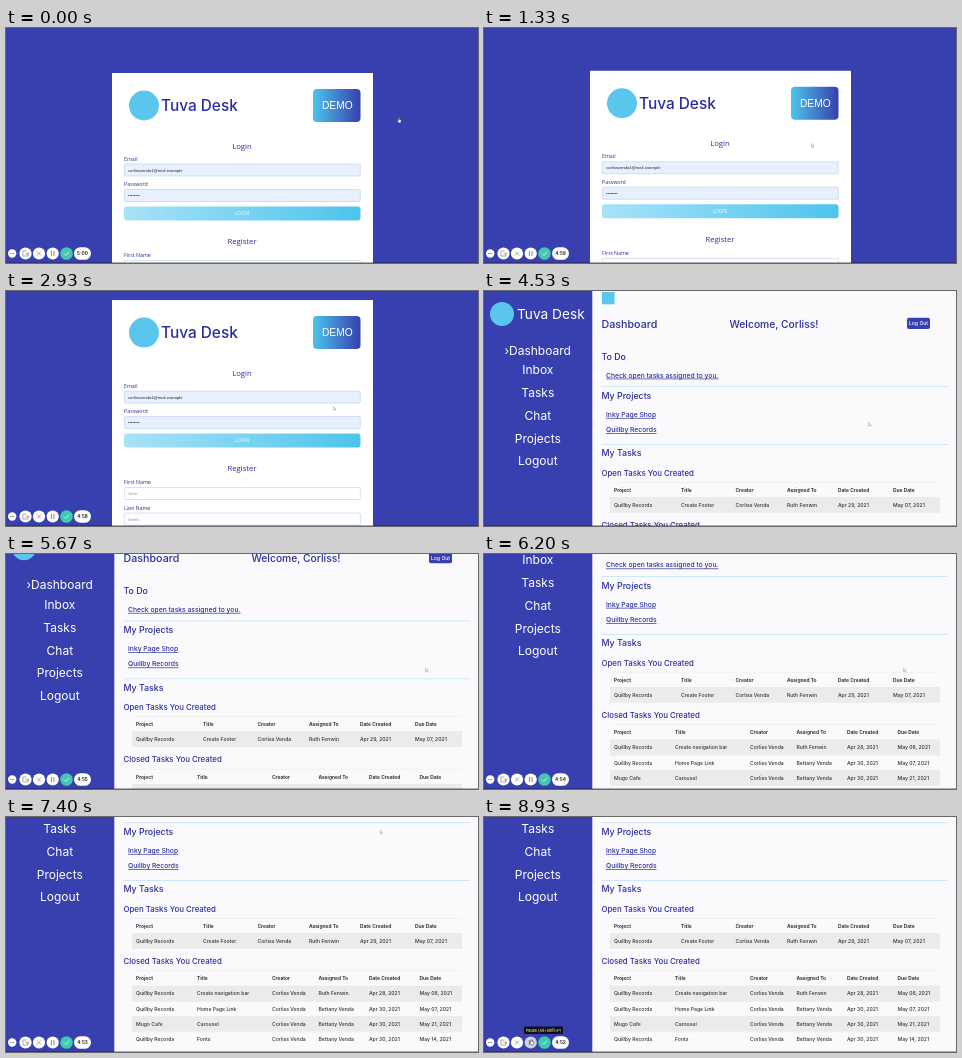
Write an HTML page that moves like this. It is 472 px wide and 235 px high and loops after 9.07 s.

```html
<!DOCTYPE html>
<html lang="en">
<head>
<meta charset="utf-8">
<title>Team workspace demo</title>
<style>
  html, body { margin: 0; width: 100%; height: 100%; overflow: hidden; background: #3740ae; }
  svg { display: block; width: 100vw; height: 100vh; }
  text { font-family: Inter, sans-serif; white-space: pre; }
  .form text { font-family: "Open Sans", sans-serif; font-weight: 500; }
  .form .arial { font-family: "Liberation Sans", Arial, sans-serif; }
  .form .brand { font-family: Inter, sans-serif; }
  .main text { font-weight: 500; }
  .main .head { font-weight: 700; }
  .link { text-decoration: underline; }
</style>
</head>
<body>
<svg id="stage" viewBox="0 0 472 235" preserveAspectRatio="none" xmlns="http://www.w3.org/2000/svg"></svg>
<script>
const LOOP = 9070, STEP = 1000 / 15;
const BLUE = '#3740ae', NAVY = '#2b2d9b', CYAN = '#5ac6ee', INK = '#333';
const BRAND = 'Tuva Desk';

const text = (x, y, size, fill, label, extra = '') =>
  `<text x="${x}" y="${y}" font-size="${size}" fill="${fill}" ${extra}>${label}</text>`;
const rect = (x, y, w, h, fill, extra = '') =>
  `<rect x="${x}" y="${y}" width="${w}" height="${h}" fill="${fill}" ${extra}/>`;
const circle = (x, y, r, fill, extra = '') =>
  `<circle cx="${x}" cy="${y}" r="${r}" fill="${fill}" ${extra}/>`;
const path = (d, extra) => `<path d="${d}" ${extra}/>`;
const MIDDLE = 'text-anchor="middle"';

const field = (y, label, value, filled) =>
  text(118, y, 5.3, NAVY, label) +
  rect(118.3, y + 3.5, 236, 12, filled ? '#e8f0fe' : '#fff', 'rx="1" stroke="#b4cfea" stroke-width=".6"') +
  text(122, y + 11, 4.2, filled ? '#222' : '#888', value, 'class="arial"');

function loginPage() {
  return rect(0, 0, 472, 235, BLUE) + '<g id="card" class="form">' +
    rect(106, 45, 261, 420, '#fff') +
    circle(138, 77.5, 15, CYAN) +
    text(155, 83.3, 15.4, NAVY, BRAND, 'class="brand"') +
    rect(307, 61, 47.5, 33, 'url(#demo)', 'rx="4"') +
    text(331.3, 81, 10.2, '#fff', 'DEMO', MIDDLE + ' class="arial"') +
    text(236, 120.5, 7.7, NAVY, 'Login', MIDDLE) +
    field(132.5, 'Email', 'corlissvenda1@mail.example', true) +
    field(158, 'Password', '••••••••', true) +
    rect(118, 178.5, 236.5, 14, 'url(#login)', 'rx="3"') +
    text(236, 187, 4.6, '#fff', 'LOGIN', MIDDLE) +
    text(236, 216.3, 7.7, NAVY, 'Register', MIDDLE) +
    field(229, 'First Name', 'John') +
    field(254.5, 'Last Name', 'Smith') +
    field(280, 'Email', 'Email') + '</g>';
}

const cells = (columns, y, size, values, extra = '') =>
  values.map((value, i) => text(columns[i], y, size, INK, value, extra)).join('');

function table(columns, top, rowHeight, rows) {
  const headers = ['Project', 'Title', 'Creator', 'Assigned To', 'Date Created', 'Due Date'];
  const line = y => rect(126, y, 330, .5, '#e6e6e8');
  const first = top + 15.2;
  return line(top) + cells(columns, top + 9.7, 4.9, headers, 'class="head"') +
    rows.map((row, i) => {
      const y = first + i * rowHeight;
      return rect(126, y, 330, rowHeight, i % 2 ? '#fafafc' : '#ebebec') + line(y) +
        cells(columns, y + rowHeight / 2 + 1.9, 5.1, row);
    }).join('');
}

function dashboardPage() {
  const shop = 'Quillby Records', owner = 'Corliss Venda', helper = 'Bettany Venda', friend = 'Ruth Fenwin';
  const menu = [['Inbox', 79], ['Tasks', 102], ['Chat', 125], ['Projects', 147.5], ['Logout', 170]];
  const heading = (y, size, label) => text(117.5, y, size, NAVY, label);
  const link = (y, label) => text(122, y, 6.75, NAVY, label, 'class="link"');
  const rule = y => rect(117.5, y, 346.5, .8, '#c3e3f6');
  return rect(0, 0, 472, 235, '#fafafc') + rect(0, 0, 108.3, 235, BLUE) + '<g id="content">' +
    circle(18, 23, 12, CYAN) + text(33, 28, 13.7, '#fff', BRAND) +
    text(20.5, 63.5, 12, '#fff', '›') + text(25, 63.5, 12, '#fff', 'Dashboard') +
    menu.map(([label, y]) => text(53.8, y + 4.4, 12, '#fff', label, MIDDLE)).join('') +
    '<g class="main">' + rect(118, 1, 12.5, 12.3, CYAN) +
    heading(36.8, 10.7, 'Dashboard') + text(245.5, 36.8, 10.3, NAVY, 'Welcome, Corliss!') +
    rect(423, 26.7, 23, 11.3, BLUE, 'rx="2"') + text(434.5, 34.4, 5.1, '#fff', 'Log Out', MIDDLE) +
    heading(68.7, 8.8, 'To Do') + link(86.6, 'Check open tasks assigned to you.') + rule(95.3) +
    heading(107.7, 8.8, 'My Projects') + link(125.9, 'Inky Page Shop') + link(141.2, shop) + rule(153.2) +
    heading(165.3, 8.8, 'My Tasks') + heading(184.8, 7.85, 'Open Tasks You Created') +
    table([130, 197, 251.5, 303, 354, 409], 191, 15.6,
      [[shop, 'Create Footer', owner, friend, 'Apr 29, 2021', 'May 07, 2021']]) +
    heading(237, 7.85, 'Closed Tasks You Created') +
    table([130, 191, 266, 312.5, 363, 413.5], 243.6, 15.3, [
      [shop, 'Create navigation bar', owner, friend, 'Apr 28, 2021', 'May 08, 2021'],
      [shop, 'Home Page Link', owner, helper, 'Apr 30, 2021', 'May 07, 2021'],
      ['Mugo Cafe', 'Carousel', owner, helper, 'Apr 30, 2021', 'May 21, 2021'],
      [shop, 'Fonts', owner, helper, 'Apr 30, 2021', 'May 14, 2021']
    ]) + '</g></g>';
}

function toolbar() {
  const stroke = color => `fill="none" stroke="${color}" stroke-width=".7"`;
  return circle(6.2, 225.5, 4.2, '#fff') + [4.6, 6.2, 7.8].map(x => circle(x, 225.5, .5, '#555')).join('') +
    [19.5, 33].map(x => circle(x, 225.5, 6.1, '#fff')).join('') + circle(46.7, 225.5, 6.1, '#fff', 'id="pause"') +
    path('M20.5 223h-3.6v5h5v-1.6M19.3 225.7h3.4m-1.3-1.4l1.4 1.4-1.4 1.4', stroke('#888')) +
    path('M31 223.5l4 4m0-4l-4 4', stroke('#888')) +
    path('M45.4 223v5m2.6-5v5', stroke('#555')) +
    circle(60.5, 225.5, 6.3, '#40c9b0') + path('M58 225.6l1.8 1.8 3.3-3.7', stroke('#fff')) +
    rect(68, 219.2, 17, 12.6, '#fff', 'rx="6.3"') +
    text(76.5, 227.2, 4.7, '#333', '', MIDDLE + ' font-weight="700" id="timer"') +
    '<g id="tooltip">' + rect(40, 209.5, 39, 7.4, '#111', 'rx="1.2"') +
    text(59.5, 214.7, 3.8, '#fff', 'Pause (Alt+Shift+P)', MIDDLE) + '</g>';
}

const $ = id => document.getElementById(id);
const gradient = (id, from, to) =>
  `<linearGradient id="${id}"><stop stop-color="${from}"/><stop offset="1" stop-color="${to}"/></linearGradient>`;
const outline = color => `fill="#fff" stroke="${color}" stroke-width=".5" stroke-linejoin="round"`;

$('stage').innerHTML =
  `<defs>${gradient('demo', '#4dc4ec', BLUE)}${gradient('login', '#a8e2f9', '#4dc4ec')}</defs>` +
  `<g id="loginPage">${loginPage()}</g><g id="dashboardPage">${dashboardPage()}</g>` +
  rect(0, 234.3, 472, .7, '#222', 'opacity=".5"') +
  `<g id="toolbar">${toolbar()}</g><g id="cursor">` +
  path('M0 0v3.6l.9-.8.6 1.4.7-.3-.6-1.3h1.1z', outline('#999') + ' id="arrow"') +
  path('M.4-2.2q.6-.5.9 0v1.6l1.8.5v1.7l-.6 1.2h-2l-1.4-2 .5-.4.8.5z', outline('#444') + ' id="hand"') + '</g>';

// Each key is [time, ...values]; values move linearly between keys.
const CARD_SCROLL = [[1200, 0], [2065, 29], [2500, 55], [3000, 29]];
const DASH_SCROLL = [[5330, 0], [5665, 28.6], [6195, 73], [6600, 83], [6930, 86], [7130, 86], [7380, 90]];
const CURSOR = [
  [70, 392, 92], [130, 391, 93], [270, 389, 94], [1130, 327.5, 115.5], [3070, 327.5, 115.5],
  [3450, 326, 155], [3950, 326, 155], [4500, 388.3, 129.7], [4670, 388.3, 129.7], [4870, 419.5, 114],
  [6270, 419.5, 114], [6930, 374, 13], [7930, 374, 13], [8730, 46.5, 225]
];

function sample(keys, time) {
  const next = keys.findIndex(key => key[0] > time);
  if (next < 1) return (next ? keys[keys.length - 1] : keys[0]).slice(1);
  const a = keys[next - 1], b = keys[next], k = (time - a[0]) / (b[0] - a[0]);
  return a.slice(1).map((value, i) => value + (b[i + 1] - value) * k);
}

const show = (id, on) => $(id).setAttribute('display', on ? 'inline' : 'none');
const move = (id, x, y) => $(id).setAttribute('transform', `translate(${x} ${y})`);

function draw(now) {
  const clock = now % LOOP, time = Math.floor((clock + 1) / STEP) * STEP;
  const onDashboard = time >= 3950, hovering = time >= 8700;
  show('loginPage', !onDashboard);
  show('dashboardPage', onDashboard);
  show('toolbar', !onDashboard || time >= 4660);
  show('tooltip', hovering);
  $('pause').setAttribute('fill', hovering ? '#cfd2dc' : '#fff');
  move('card', 0, -sample(CARD_SCROLL, time)[0]);
  move('content', 0, -sample(DASH_SCROLL, time)[0]);
  move('cursor', ...sample(CURSOR, time));
  const hand = time < 270 || (time >= 3300 && !onDashboard) || hovering;
  show('hand', hand);
  show('arrow', !hand);
  const left = 300 - Math.floor(time / 1000);
  $('timer').textContent = `${Math.floor(left / 60)}:${String(left % 60).padStart(2, '0')}`;
}

const start = performance.now();
function tick() {
  draw(performance.now() - start);
  requestAnimationFrame(tick);
}
tick();
</script>
</body>
</html>
```
